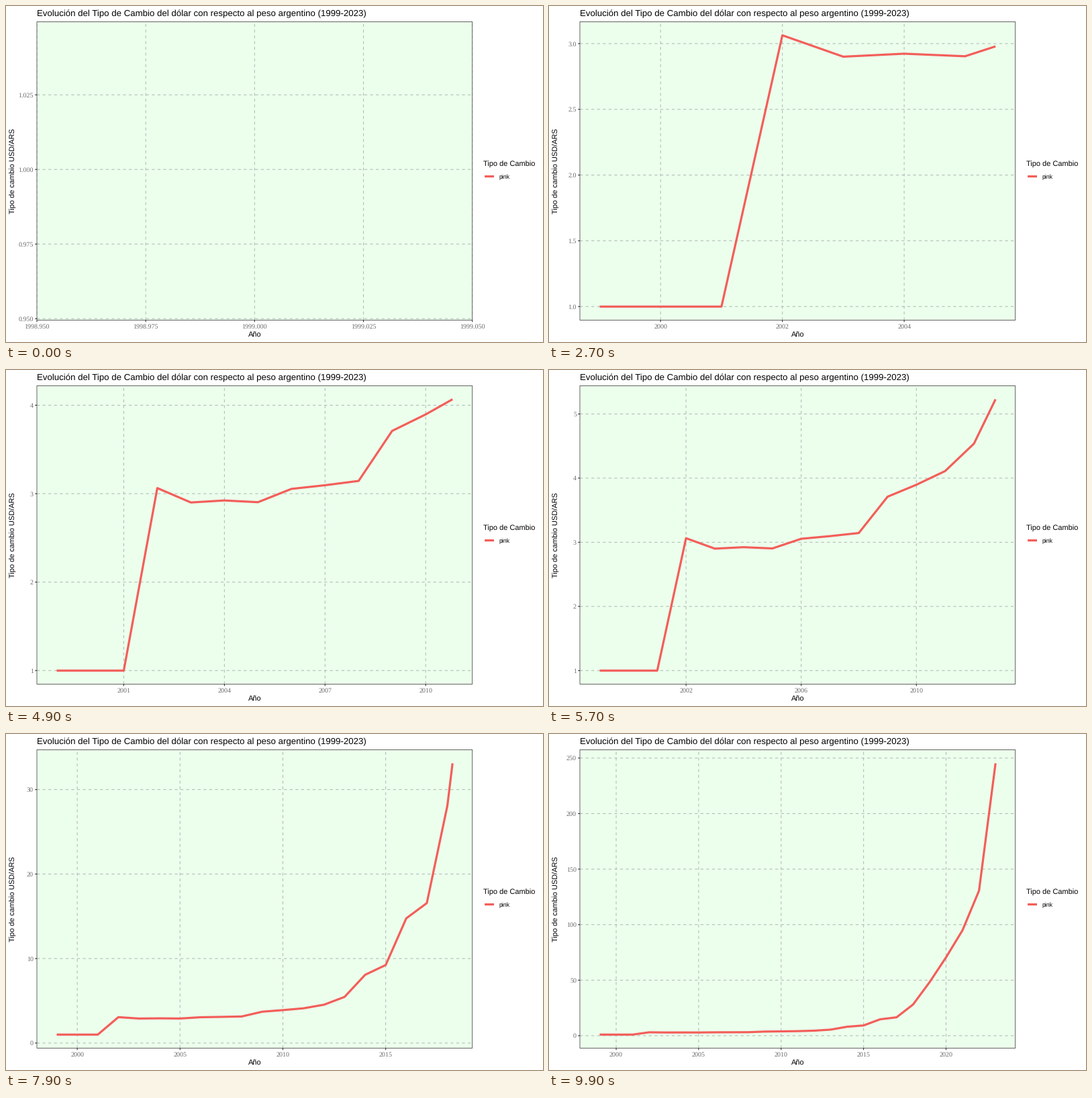
These frames come from a looping animation (800x500 px, 10 s). A matplotlib script:

```python
import itertools
import math

import matplotlib.pyplot as plt
import numpy as np
from matplotlib.animation import FuncAnimation
from matplotlib.patches import Rectangle

plt.rcParams.update({"text.hinting": "none", "path.simplify": False})

W, H, DPI = 800, 500, 100
PX = 72 / DPI
FRAMES = 100
LEFT, RIGHT, TOP, BOTTOM = 46, 694.7, 23.4, 467.5
SANS, SERIF = "Liberation Sans", "Liberation Serif"
RED, GRID, DARK, GREY = "#F35E5A", "#B0BBB8", "#222222", "#6C6C6C"

YEARS = np.arange(1999, 2024)
RATES = np.array([
    0.9995, 0.9995, 0.9995, 3.0633, 2.9006, 2.9233, 2.9037, 3.0543, 3.0956,
    3.1442, 3.7101, 3.8963, 4.1101, 4.5369, 5.4594, 8.0753, 9.2332, 14.7582,
    16.5627, 28.095, 48.148, 70.539, 94.991, 130.62, 245.3])
# Each year lands on a whole frame; time runs linearly in between.
KEYS = [round(k * (FRAMES - 1) / 24) for k in range(25)]

NICE = [1, 5, 2, 2.5, 4, 3]


def nice_breaks(lo, hi, m=5):
    """Extended Wilkinson tick positions for the range lo..hi."""
    best, ticks = -2, []
    span = hi - lo
    for j in itertools.count(1):
        for i, q in enumerate(NICE):
            simple = 1 - i / (len(NICE) - 1) - j
            top = 0.25 * (simple + 1) + 0.05
            if top + 0.7 < best:
                return ticks
            for k in itertools.count(2):
                dense = 2 - (k - 1) / (m - 1) if k >= m else 1
                if top + 0.2 + 0.5 * dense < best:
                    break
                z0 = math.ceil(math.log10(span / (k + 1) / j / q))
                for z in itertools.count(z0):
                    step = j * q * 10.0 ** z
                    width = step * (k - 1)
                    over = max(0, (width - span) / 2)
                    cover = 1 - (over / (0.1 * span)) ** 2
                    if top + 0.2 * cover + 0.5 * dense < best:
                        break
                    first = math.floor(hi / step) * j - (k - 1) * j
                    last = math.ceil(lo / step) * j
                    for start in range(first, last + 1):
                        a = start * step / j
                        b = a + width
                        zero = start % j == 0 and a <= 0 <= b
                        c = 1 - 0.5 * ((hi - b) ** 2 + (lo - a) ** 2) / (0.1 * span) ** 2
                        ratio = (m - 1) / (max(b, hi) - min(a, lo)) * step
                        d = 2 - max(ratio, 1 / ratio)
                        score = 0.25 * (simple + zero) + 0.2 * c + 0.5 * d + 0.05
                        if score > best:
                            best = score
                            ticks = [a + n * step for n in range(k)]


def view(lo, hi):
    """Expanded axis range with its visible breaks and their labels."""
    pad = 0.05 * (hi - lo) if hi - lo > 1e-9 else 0.05
    lo, hi = lo - pad, hi + pad
    ticks = [b for b in nice_breaks(lo, hi) if lo - 1e-9 <= b <= hi + 1e-9]
    digits = next((d for d in range(6)
                   if all(abs(round(b, d) - b) < 1e-7 for b in ticks)), 6)
    return lo, hi, ticks, [f"{b:.{digits}f}" for b in ticks]


fig = plt.figure(figsize=(W / DPI, H / DPI), dpi=DPI, facecolor="white")
ax = fig.add_axes([0, 0, 1, 1])
ax.set(xlim=(0, W), ylim=(H, 0))
ax.axis("off")


def label(x, y, s, size, font=SANS, color="black", **kw):
    kw = {"ha": "left", "va": "baseline", **kw}
    return ax.text(x, y, s, fontsize=size * PX, family=font, color=color, **kw)


def stroke(xs, ys, width, color, z, **kw):
    line, = ax.plot(xs, ys, lw=width * PX, color=color, zorder=z,
                    solid_capstyle="butt", dash_capstyle="butt",
                    solid_joinstyle="round", snap=False, **kw)
    return line


def box(z, **kw):
    return ax.add_patch(Rectangle((LEFT, TOP), RIGHT - LEFT, BOTTOM - TOP,
                                  zorder=z, snap=False, **kw))


panel = box(0, fc="#ECFFEC", ec="none")
box(5, fc="none", ec="#333333", lw=0.75 * PX)
label(45.7, 15, "Evolución del Tipo de Cambio del dólar con respecto al "
      "peso argentino (1999-2023)", 13.2)
label(370.3, 493.2, "Año", 11, ha="center")
label(13.4, 246, "Tipo de cambio USD/ARS", 11, ha="center", rotation=90,
      rotation_mode="anchor")
label(711.3, 239.2, "Tipo de Cambio", 11)
label(734, 257, "pink", 8.8)
stroke([713.1, 727], [253.6, 253.6], 3.2, RED, 3)

curve = stroke([], [], 3.2, RED, 4)
curve.set_clip_path(panel)
moving = []


def grid_line(xs, ys):
    line = stroke(xs, ys, 1.07, GRID, 1, dashes=(4, 4))
    line.set_clip_path(panel)
    return line


def draw(i):
    while moving:
        moving.pop().remove()

    now = np.interp(i, KEYS, YEARS)
    past = YEARS < now
    xs = np.append(YEARS[past], now)
    ys = np.append(RATES[past], np.interp(now, YEARS, RATES))

    x0, x1, xticks, xnames = view(xs[0], now)
    y0, y1, yticks, ynames = view(ys.min(), ys.max())

    def px(x):
        return LEFT + (x - x0) / (x1 - x0) * (RIGHT - LEFT)

    def py(y):
        return BOTTOM - (y - y0) / (y1 - y0) * (BOTTOM - TOP)

    for x, name in zip(map(px, xticks), xnames):
        moving.append(grid_line([x, x], [BOTTOM, TOP]))
        moving.append(stroke([x, x], [BOTTOM, BOTTOM + 2.75], 1.07, DARK, 2))
        moving.append(label(x, 480, name, 10, SERIF, GREY, ha="center"))
    for y, name in zip(map(py, yticks), ynames):
        moving.append(grid_line([LEFT, RIGHT], [y, y]))
        moving.append(stroke([LEFT - 2.75, LEFT], [y, y], 1.07, DARK, 2))
        moving.append(label(41, y + 3.4, name, 10, SERIF, GREY, ha="right"))

    if len(xs) > 1:
        curve.set_data(px(xs), py(ys))
    else:
        curve.set_data([], [])
    return [curve, *moving]


anim = FuncAnimation(fig, draw, frames=FRAMES, interval=100, repeat=True,
                     init_func=lambda: draw(0), blit=False)
plt.show()
```
